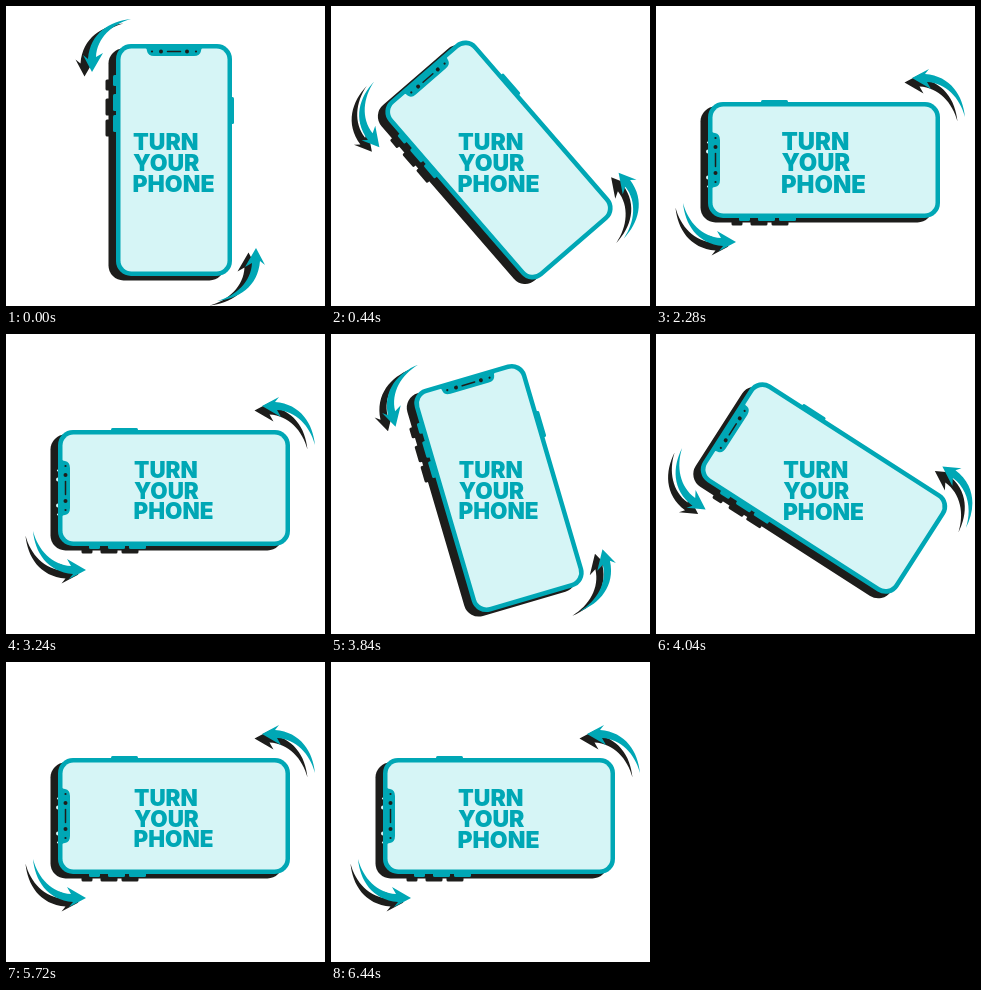
An HTML page that plays this animation: 319x300 px, repeating every 7000 ms.

```html
<!DOCTYPE html>
<html lang="en">
<head>
<meta charset="utf-8">
<title>Turn your phone</title>
<style>
  html, body { margin: 0; width: 100%; height: 100%; overflow: hidden; background: #fff; }
  svg { display: block; width: 319px; height: 300px; }
  text { font: 900 23px Inter, "Open Sans", sans-serif; fill: #00a7b5; }
</style>
</head>
<body>
<svg viewBox="0 0 319 300">
  <defs>
    <path id="arrow" d="M-43-141C-64-139-84-127-86-101L-91-105-82-88-71-107-78-103C-77-122-62-136-43-141Z"/>
    <g id="outline">
      <rect x="-58" y="-116" width="116" height="232" rx="15"/>
      <rect x="-61" y="-85" width="6" height="11" rx="1.5"/>
      <rect x="-61" y="-66" width="6" height="17" rx="1.5"/>
      <rect x="-61" y="-45" width="6" height="17" rx="1.5"/>
      <rect x="54" y="-63" width="6" height="27" rx="1.5"/>
      <use href="#arrow"/>
      <use href="#arrow" transform="rotate(180)"/>
    </g>
    <g id="sensors">
      <circle cx="-13" cy="-108.5" r="2"/>
      <circle cx="13" cy="-108.5" r="2"/>
      <circle cx="-22" cy="-108.5" r="1.1"/>
      <circle cx="22" cy="-108.5" r="1.1"/>
    </g>
  </defs>

  <g transform="translate(160.5 158.5)">
    <g class="turn">
      <use href="#outline" fill="#1d1d1b"/>
      <use href="#sensors" fill="#d6f5f6"/>
    </g>
  </g>

  <g transform="translate(168 154)">
    <g class="turn">
      <use href="#outline" fill="#00a7b5"/>
      <rect x="-53.5" y="-111.5" width="107" height="223" rx="11" fill="#d6f5f6"/>
      <path d="M-30-113Q-27-112-27-109-26-104-20-104H20Q26-104 27-109 27-112 30-113Z" fill="#00a7b5"/>
      <use href="#sensors" fill="#1d1d1b"/>
      <path d="M-6.5-108.5h13" stroke="#1d1d1b" stroke-width="1.5" stroke-linecap="round"/>
    </g>
  </g>

  <g id="label">
    <text x="127" y="144">TURN</text>
    <text x="127" y="165">YOUR</text>
    <text x="126.5" y="186">PHONE</text>
  </g>
</svg>
<script>
  const LOOP = 7000, STEP = 40, SECOND_TURN = 3520;
  const PEAK = 2300, PULSE = 2040, SMALL = 0.975;
  const phones = document.querySelectorAll('.turn');
  const label = document.getElementById('label');
  const clamp = v => Math.min(1, Math.max(0, v));

  function phoneAngle(t) {
    const local = t < SECOND_TURN ? t : t - SECOND_TURN;
    return -90 * clamp((local - 240) / 440);
  }

  // The label rests, shrinks gently, then swells to a sharp peak every pulse.
  function labelScale(t) {
    if (t < 800 || t >= 6440) return 1;
    if (t < 1640) {
      const p = (t - 760) / 880;
      return 1 - (1 - SMALL) * p * p * (3 - 2 * p);
    }
    const phase = ((t - PEAK + PULSE) % PULSE) / PULSE;
    return SMALL + 0.065 * Math.abs(2 * phase - 1) ** 4;
  }

  function draw(now) {
    const t = Math.floor((now % LOOP) / STEP) * STEP;
    const turn = `rotate(${phoneAngle(t)})`;
    phones.forEach(phone => phone.setAttribute('transform', turn));
    label.setAttribute('transform',
      `translate(169.5 157) scale(${labelScale(t)}) translate(-169.5 -157)`);
  }

  const start = performance.now();
  function tick() {
    draw(performance.now() - start);
    requestAnimationFrame(tick);
  }
  tick();
</script>
</body>
</html>
```
